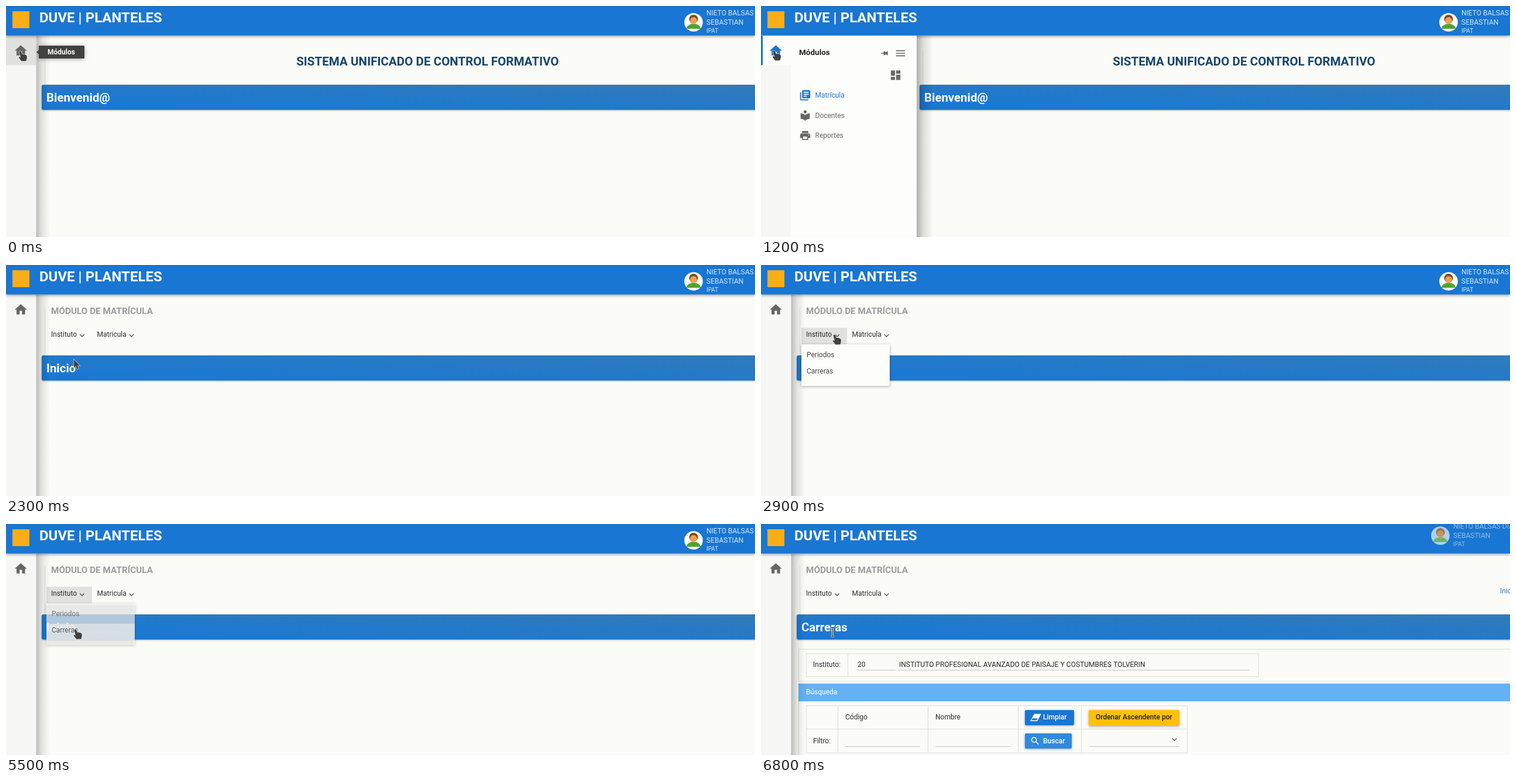
An HTML page with a canvas for the animation above (6900 ms loop, 1280 by 396 pixels).

```html
<!DOCTYPE html>
<html lang="es">
<head>
<meta charset="utf-8">
<title>Módulos</title>
<style>
html, body { margin: 0; width: 100%; height: 100%; overflow: hidden; background: #fbfcf8; }
canvas { display: block; width: 1280px; height: 396px; }
</style>
</head>
<body>
<canvas id="stage" width="1280" height="396"></canvas>
<script>
const ctx = document.getElementById('stage').getContext('2d');
const LOOP = 6900, STEP = 100;
const BLUE = '#1976d2', GREY = '#666', PAGE = '#fbfcf8', INK = '#2b2b2b';

const ICONS = {
  home: 'M10 20v-6h4v6h5v-8h3L12 3 2 12h3v8z',
  books: 'M4 6H2v14c0 1.1.9 2 2 2h14v-2H4V6zm16-4H8c-1.1 0-2 .9-2 2v12c0 1.1.9 2 2 2h12c1.1 0 2-.9 2-2V4c0-1.1-.9-2-2-2zm-1 9H9V9h10v2zm-4 4H9v-2h6v2zm4-8H9V5h10v2z',
  reader: 'M12 11.55C9.64 9.35 6.48 8 3 8v11c3.48 0 6.64 1.35 9 3.55 2.36-2.19 5.52-3.55 9-3.55V8c-3.48 0-6.64 1.35-9 3.55zM12 8c1.66 0 3-1.34 3-3s-1.34-3-3-3-3 1.34-3 3 1.34 3 3 3z',
  print: 'M19 8H5c-1.66 0-3 1.34-3 3v6h4v4h12v-4h4v-6c0-1.66-1.34-3-3-3zm-3 11H8v-5h8v5zm3-7c-.55 0-1-.45-1-1s.45-1 1-1 1 .45 1 1-.45 1-1 1zm-1-9H6v4h12V3z',
  tiles: 'M3 13h8V3H3v10zm0 8h8v-6H3v6zm10 0h8V11h-8v10zm0-18v6h8V3h-8z',
  lines: 'M3 18h18v-2H3v2zm0-5h18v-2H3v2zm0-7v2h18V6H3z',
  search: 'M15.5 14h-.79l-.28-.27A6.47 6.47 0 0 0 16 9.5 6.5 6.5 0 1 0 9.5 16c1.61 0 3.09-.59 4.23-1.57l.27.28v.79l5 4.99L20.49 19l-4.99-5zm-6 0C7.01 14 5 11.99 5 9.5S7.01 5 9.5 5 14 7.01 14 9.5 11.99 14 9.5 14z',
  pin: 'M4 11h6v-4h2l2 2h4V7h2v10h-2v-2h-4l-2 2h-2v-4H4z'
};
const HAND = 'M-6.6 -7.4Q-5 -9.4 -3.2 -7.6L-1.2 -3.2L3.6 -2.8Q6.6 -2 6.9 .6L6.6 4.6L5.4 8.2L-2.6 8.4L-7.2 2.6Q-7.4 .6 -5.2 1.2L-4 2.2Z';
const ARROW = 'M0 0V14.5L3.4 11.4L5.8 16.6L8.2 15.5L5.9 10.5H10.2Z';
const shapes = {};
const shape = d => shapes[d] || (shapes[d] = new Path2D(d));

const clamp = x => Math.max(0, Math.min(1, x));
const span = (t, a, b) => clamp((t - a) / (b - a));
const smooth = x => x * x * (3 - 2 * x);
const mix = (a, b, k) => a + (b - a) * k;

function box(x, y, w, h, fill) {
  ctx.fillStyle = fill;
  ctx.fillRect(x, y, w, h);
}

function round(x, y, w, h, r, fill, blur = 0) {
  ctx.save();
  if (blur) {
    ctx.shadowColor = 'rgba(0,0,0,.35)';
    ctx.shadowBlur = blur;
    ctx.shadowOffsetY = 1;
  }
  ctx.fillStyle = fill;
  ctx.beginPath();
  ctx.roundRect(x, y, w, h, r);
  ctx.fill();
  ctx.restore();
}

function text(s, x, y, size, fill, weight = 400, align = 'left') {
  ctx.font = `${weight} ${size}px Roboto, sans-serif`;
  ctx.textAlign = align;
  ctx.fillStyle = fill;
  ctx.fillText(s, x, y);
}

function icon(name, cx, cy, scale, fill) {
  ctx.save();
  ctx.translate(cx - 12 * scale, cy - 12 * scale);
  ctx.scale(scale, scale);
  ctx.fillStyle = fill;
  ctx.fill(shape(ICONS[name]));
  ctx.restore();
}

function poly(points, fill) {
  ctx.beginPath();
  points.forEach(p => ctx.lineTo(...p));
  ctx.fillStyle = fill;
  ctx.fill();
}

function disc(x, y, r, fill) {
  ctx.beginPath();
  ctx.arc(x, y, r, 0, 7);
  ctx.fillStyle = fill;
  ctx.fill();
}

function chevron(x, y) {
  ctx.strokeStyle = '#555';
  ctx.lineWidth = 1.4;
  ctx.beginPath();
  ctx.moveTo(x - 3.7, y - 2);
  ctx.lineTo(x, y + 1.9);
  ctx.lineTo(x + 3.7, y - 2);
  ctx.stroke();
}

function shade(x, top, w, alpha) {
  const g = ctx.createLinearGradient(x, 0, x + w, 0);
  g.addColorStop(0, `rgba(0,0,0,${alpha})`);
  g.addColorStop(.4, `rgba(0,0,0,${alpha * .4})`);
  g.addColorStop(1, 'rgba(0,0,0,0)');
  box(x, top, w, 396 - top, g);
}

function titleBar(x, y, label) {
  const w = 1380 - x, h = 43, len = Math.hypot(w, h);
  const cx = x + w / 2, cy = y + h / 2;
  const dx = -h * w * h / (len * len), dy = w * w * h / (len * len);
  const g = ctx.createLinearGradient(cx - dx, cy - dy, cx + dx, cy + dy);
  g.addColorStop(0, '#337ab7');
  g.addColorStop(.8, '#1b79d3');
  g.addColorStop(1, BLUE);
  round(x, y, w, h, 3, g, 3);
  text(label, x + 8, y + 28.5, 20.4, '#fff', 700);
}

function header(moved) {
  ctx.save();
  ctx.shadowColor = 'rgba(0,0,0,.4)';
  ctx.shadowBlur = 5;
  ctx.shadowOffsetY = 1;
  box(0, 0, 1280, 50.5, BLUE);
  ctx.restore();
  box(0, 0, 1280, 1, '#2272bd');
  box(11, 9, 29, 29, '#fbad18');
  text('DUVE | PLANTELES', 57, 28, 24, '#fff', 700);

  ctx.save();
  if (moved) {
    ctx.translate(-14, -8);
    ctx.globalAlpha = .65;
  }
  disc(1175, 28, 15.8, '#fff');
  ctx.beginPath();
  ctx.ellipse(1175, 39, 12, 8.5, 0, Math.PI, 0);
  ctx.fillStyle = '#4fa52c';
  ctx.fill();
  disc(1175, 22.5, 7.5, '#7a4a1d');
  disc(1175, 25, 6, '#eea04f');
  const pale = '#d3e4f6';
  text('NIETO BALSAS DIAS', 1197, 16, 12, pale);
  text('SEBASTIAN', 1197, 31.5, 12, pale);
  text('IPAT', 1197, 46, 10, pale);
  ctx.restore();
}

function welcome(x) {
  box(x + 5, 76, 1, 58, '#e6e7e4');
  text('SISTEMA UNIFICADO DE CONTROL FORMATIVO', (x + 1380) / 2, 102, 20.6, '#17456b', 700, 'center');
  titleBar(x, 135, 'Bienvenid@');
}

function menuItem(name, label, y, fill) {
  icon(name, 75.5, y, .87, fill);
  text(label, 92.5, y + 4.3, 12, fill);
}

function drawer(t, p, pointerY) {
  const right = 51 + 215 * p;
  shade(right, 51, 28, .3);
  box(0, 51, 51, 345, '#f7f8f6');
  box(0, 51, 51, 50.5, '#fdfdfd');
  box(0, 51, 3, 50.5, BLUE);
  ctx.save();
  ctx.beginPath();
  ctx.rect(51, 51, right - 51, 345);
  ctx.clip();
  box(51, 51, 215, 345, '#fdfdfc');
  const over = t >= 1200 && pointerY > 140;
  if (over) {
    round(49, 136, 212, 34, 3, '#dfdfde');
    if (t >= 1900) {
      ctx.save();
      ctx.beginPath();
      ctx.rect(51, 136, 210, 34);
      ctx.clip();
      disc(117, 160, 66 + (t - 1900) * .4, '#e8e8e7');
      ctx.restore();
    }
  }
  text('Módulos', 65, 84, 13.5, '#222', 700);
  icon('pin', 211, 81, .72, GREY);
  icon('lines', 238.5, 81, .87, GREY);
  icon('tiles', 230, 118.7, .9, GREY);
  menuItem('books', 'Matrícula', 153, over ? '#4594df' : BLUE);
  menuItem('reader', 'Docentes', 187.5, GREY);
  menuItem('print', 'Reportes', 222, GREY);
  ctx.restore();
  icon('home', 25.3, 76.5, 1.04, t <= 700 ? '#5389bd' : BLUE);
}

function rail(hover) {
  shade(51, 51, 24, .26);
  box(0, 50, 51.5, 346, '#f7f8f6');
  if (hover) box(0, 50, 51.5, 51.5, '#e1e2e0');
  icon('home', 25.3, 76.5, 1.04, GREY);
}

function tooltip() {
  round(56, 68, 78, 22, 1, '#414240', 7);
  poly([[52, 79], [56.5, 75], [56.5, 83]], '#414240');
  text('Módulos', 71, 83, 12, '#fff', 700);
}

function moduleTop(active) {
  box(66, 72, 1, 83, '#e6e7e4');
  text('MÓDULO DE MATRÍCULA', 77, 84.3, 15.3, '#9c9d9b', 700);
  if (active) box(69, 107.5, 78, 28.5, '#e1e2e0');
  text('Instituto', 77, 123, 12, INK);
  chevron(130, 121);
  text('Matricula', 155.5, 123, 12, INK);
  chevron(214.5, 121);
}

function dropdown(alpha, pointerY) {
  ctx.save();
  ctx.globalAlpha = alpha;
  round(69, 136, 151, 71.5, 1, '#fdfdfc', 4);
  const row = pointerY > 170 ? 171 : pointerY > 146 ? 143.5 : 0;
  if (row) box(69, row, 151, 27, '#ebebea');
  text('Periodos', 78, 158.3, 12, row === 143.5 ? '#111' : '#444');
  text('Carreras', 78, 185.8, 12, row === 171 ? '#111' : '#444');
  ctx.restore();
}

function grid(x, y, w, h, cols = [], rows = []) {
  ctx.strokeStyle = '#dcdcd8';
  ctx.lineWidth = 1;
  ctx.strokeRect(x + .5, y + .5, w, h);
  cols.forEach(c => box(c, y, 1, h, '#dcdcd8'));
  rows.forEach(r => box(x, r, w, 1, '#dcdcd8'));
}

function underline(x, y, w) {
  box(x, y, w, 1, '#c4c4c2');
}

function careers() {
  text('Inicio', 1263, 119, 12, '#2a7fd0');
  grid(64, 214, 1300, 55);
  grid(77, 222, 773, 39, [148]);
  text('Instituto:', 89, 245, 12, INK);
  text('20', 165, 245, 12, INK);
  text('INSTITUTO PROFESIONAL AVANZADO DE PAISAJE Y COSTUMBRES TOLVERIN', 236, 245, 12, INK);
  underline(163, 250, 67);
  underline(234, 250, 600);

  grid(64, 274, 1300, 160);
  box(64, 273.5, 1216, 30.5, '#64b1f4');
  text('Búsqueda', 77, 292.3, 12, '#fff');
  grid(77, 311, 651, 81, [131, 285, 439, 547], [351]);
  text('Código', 144, 335.3, 12, INK);
  text('Nombre', 298, 335.3, 12, INK);
  text('Filtro:', 89, 375.7, 12, INK);
  underline(144, 381, 128);
  underline(298, 381, 128);
  underline(561, 381, 154);
  chevron(706.5, 369.5);

  round(451, 319, 84, 26, 2, BLUE, 4);
  poly([[467, 325.5], [479, 325.5], [472, 338], [460, 338]], '#fff');
  poly([[463.8, 333.2], [473, 333.2], [471, 336.6], [462, 336.6]], BLUE);
  text('Limpiar', 482, 335.3, 12, '#fff', 500);
  round(560, 319, 155, 27, 2, '#fec107', 4);
  text('Ordenar Ascendente por', 572, 335.3, 12, '#222', 500);
  round(451, 359, 80, 26, 2, '#2f8ae0', 4);
  icon('search', 468.5, 372, .75, '#fff');
  text('Buscar', 482, 375.7, 12, '#fff', 500);
}

function pointer(kind, x, y) {
  ctx.save();
  ctx.translate(x, y);
  if (kind === 'beam') {
    for (const [w, c] of [[3, '#fff'], [1.3, '#333']]) {
      ctx.strokeStyle = c;
      ctx.lineWidth = w;
      ctx.stroke(shape('M-3 -7.5H3M0 -7.5V7.5M-3 7.5H3'));
    }
  } else {
    const p = shape(kind === 'hand' ? HAND : ARROW);
    ctx.strokeStyle = 'rgba(255,255,255,.7)';
    ctx.lineWidth = 1.4;
    ctx.stroke(p);
    ctx.fillStyle = '#414141';
    ctx.fill(p);
  }
  ctx.restore();
}

// Pointer stops: start, end, x, y
const MOVES = [[100, 200, 27, 85], [1200, 1800, 118, 166], [2500, 2800, 130, 128], [4000, 4300, 123, 189]];

function pointerAt(t) {
  let x = 29, y = 86;
  for (const [a, b, tx, ty] of MOVES) {
    const k = smooth(span(t, a, b));
    x = mix(x, tx, k);
    y = mix(y, ty, k);
  }
  return [x, y];
}

function pointerKind(t, y) {
  if (t >= 6600) return 'beam';
  if (t >= 5600) return 'arrow';
  if (t < 2200) return y < 101 || y > 140 ? 'hand' : 'arrow';
  return t < 2800 ? 'arrow' : 'hand';
}

function draw(t) {
  const [x, y] = pointerAt(t);
  const open = 1 - (1 - span(t, 480, 947)) ** 2;
  const done = t >= 6600;
  box(0, 0, 1280, 396, PAGE);

  if (t < 2200) {
    welcome(Math.round(61 + 210 * open));
    if (open > 0) {
      header(false);
      drawer(t, open, y);
    } else {
      rail(true);
      header(false);
      tooltip();
    }
  } else {
    const menu = span(t, 2700, 2900) * (1 - span(t, 5400, 5700));
    moduleTop(menu > 0);
    titleBar(61, 155, done ? 'Carreras' : 'Inicio');
    if (done) careers();
    rail(false);
    header(done);
    if (menu > 0) dropdown(menu, y);
  }

  const kind = pointerKind(t, y);
  if (kind === 'hand') pointer(kind, x, y);
  else if (kind === 'arrow') pointer(kind, x - 2, y - 4);
  else pointer(kind, 122, 185);
}

const start = performance.now();
function tick() {
  const t = (performance.now() - start) % LOOP;
  draw(Math.floor(t / STEP) * STEP);
  requestAnimationFrame(tick);
}
tick();
</script>
</body>
</html>
```
